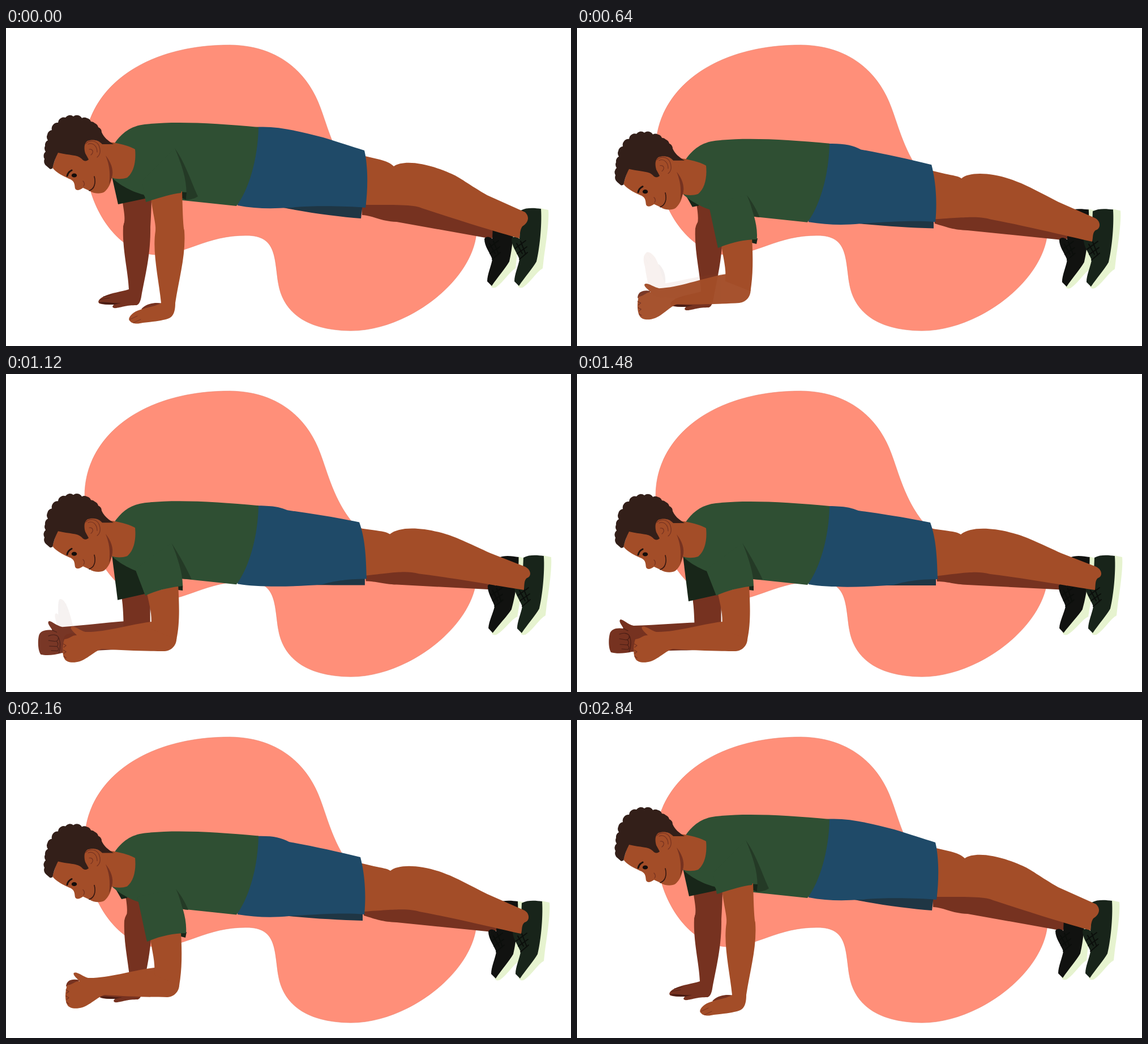
Write an HTML page that moves like this. It is 998 by 561 pixels and loops after 2.88 s.

```html
<!DOCTYPE html>
<html lang="en">
<head>
<meta charset="utf-8">
<title>Plank up-down</title>
<style>
  html, body { margin: 0; width: 100%; height: 100%; overflow: hidden; background: #fff; }
  svg { display: block; width: 100%; height: 100%; }
</style>
</head>
<body>
<svg id="stage" viewBox="0 0 998 561"></svg>
<script>
const LOOP = 2880;
const SKIN = '#a34d28', SHADE = '#763220', DEEP = '#4a1d14', HAIR = '#331f19';
const SHIRT = '#2f4f33', FOLD = '#243a26', SHIRT_DARK = '#182619';
const SHORTS = '#1f4a68', SHORTS_DARK = '#1f3644', SOLE = '#e6f3cf';

const stage = document.getElementById('stage');
const morphs = [];

function add(parent, tag, attrs) {
  const el = document.createElementNS('http://www.w3.org/2000/svg', tag);
  for (const key in attrs) el.setAttribute(key, attrs[key]);
  parent.appendChild(el);
  return el;
}
const group = (parent = stage) => add(parent, 'g', {});
const fill = (parent, color, d) => add(parent, 'path', { d, fill: color });
const line = (parent, color, width, d) => add(parent, 'path', {
  d, fill: 'none', stroke: color, 'stroke-width': width,
  'stroke-linecap': 'round', 'stroke-linejoin': 'round'
});

// A path with three poses: high plank, one forearm down, low plank.
function morph(color, high, half, low, nearArm = false) {
  const nums = s => s.match(/[\d.]+/g).map(Number);
  const el = fill(stage, color, high);
  morphs.push({ el, nearArm, form: high, poses: [high, half, low].map(nums) });
  return el;
}

const blend = (a, b, c, u, v) => a + (b - a) * u + (c - b) * v;
const blendAll = (poses, u, v) => poses[0].map((a, i) => blend(a, poses[1][i], poses[2][i], u, v));

const blob = fill(stage, '#ff8f79', 'M139,215 C139,110 240,30 395,30 C483,31 533,80 555,140 ' +
  'C568,174 579,222 612,262 C670,310 832,300 831,362 C822,450 705,535 608,534 C535,533 490,505 481,450 ' +
  'C474,405 478,366 425,366 C355,365 318,400 265,400 C200,398 139,320 139,215Z');
blob.setAttribute('stroke', '#e8806c');
blob.setAttribute('stroke-width', .6);

// Far arm
const farPlank = group();
fill(farPlank, SHADE, 'M232,438 C190,438 140,443 100,444 C90,442 82,433 77,433 C72,436 80,444 82,449 ' +
  'C70,447 60,450 58,458 C55,470 56,485 60,491 C70,494 85,493 97,490 C130,488 200,488 232,486 ' +
  'C262,484 262,440 232,438Z');
line(farPlank, DEEP, 1.2, 'M75,459 C82,456 89,457 92,461 C93,466 91,469 86,469 L75,467 M76,477 L89,478 ' +
  'C92,476 92,472 89,469 M79,485 L90,486 C93,484 92,480 89,478 M92,461 C96,468 96,480 92,490 M82,449 L90,453');
const farFlat = group();
fill(farFlat, SHADE, 'M207,350 C205,390 216,430 217,461 C205,465 186,467 172,474 C164,478 161,483 165,486 ' +
  'C176,489 186,487 191,488 C186,491 188,495 195,494 C207,492 212,489 231,489 C236,487 238,480 239,474 ' +
  'C245,440 256,400 255,350 C250,320 212,320 207,350Z');
fill(farFlat, DEEP, 'M164,484 C174,482 188,486 203,485 L191,488 C180,488 170,488 164,484Z');
line(farFlat, DEEP, .8, 'M167,479 L183,476 M172,474 L186,471');

morph(SHADE,
  'M205,300 C208,325 212,335 207,352 L255,352 C256,335 257,315 257,295Z',
  'M211,308 C214,330 216,340 210,356 L257,356 C258,340 258,320 258,300Z',
  'M204,395 C207,415 207,430 208,455 L255,455 C254,425 255,405 256,385Z');
morph(SHIRT_DARK,
  'M187,262 L198,311 L255,299 L230,278Z',
  'M190,292 L204,316 L214,314 L215,298Z',
  'M187,320 L197,401 L246,390 L230,340Z');

// Legs and shoes
const farLeg = morph(SHADE,
  'M628,308 L629,330 C650,331 660,341 690,342 L858,372 L866,355 L735,310 L700,300Z',
  'M630,334 L632,345 C655,352 665,356 690,357 L860,374 L890,362 L735,330 L700,322Z',
  'M634,354 L636,366 C655,366 665,371 690,372 L866,381 L900,372 L735,345 L700,338Z');

function shoe(color) {
  const g = group();
  fill(g, SOLE, 'M944,318 L958,321 C960,340 953,385 950,406 L948,424 C937,430 928,447 914,457 ' +
    'C909,460 904,458 904,453 L934,412Z');
  fill(g, color, 'M909,322 C920,316 935,318 945,319 C947,350 942,392 937,412 C930,424 916,440 906,455 ' +
    'L898,447 C898,435 905,420 907,408 C902,395 893,385 893,372 C896,367 902,368 907,372Z');
  line(g, '#0b0e0b', 2, 'M899,389 L918,375 M903,398 L920,386 M907,408 L921,396 M902,380 L912,398 M909,376 L918,399');
  return g;
}
const farShoe = shoe('#111210');
const nearShoe = shoe('#18241a');

morph(SKIN,
  'M630,225 L660,232 C672,235 680,239 685,244 C700,234 735,235 784,256 C800,262 820,278 850,295 L917,325 ' +
  'C926,334 922,344 912,350 C908,356 908,362 907,371 C880,364 820,346 735,318 C722,312 700,312 636,312Z',
  'M625,252 L650,258 C664,261 674,262 679,266 C692,254 735,254 778,272 C795,278 820,292 850,307 L916,336 ' +
  'C926,342 925,355 916,357 C910,362 912,370 910,377 C880,371 810,353 730,338 C710,332 690,334 630,338Z',
  'M620,272 L650,276 C664,278 672,279 678,283 C695,269 735,270 778,283 C795,288 825,302 855,316 L917,340 ' +
  'C929,346 928,358 920,360 C915,364 916,372 915,381 C880,376 790,360 730,353 C705,347 690,350 630,357Z');

morph(SHORTS_DARK,
  'M480,312 L490,317 C540,327 590,333 627,336 L630,310Z',
  'M485,342 L500,346 C540,350 590,353 630,354 L630,335Z',
  'M500,368 L520,373 C560,373 600,373 634,373 L634,355Z');
morph(SHORTS,
  'M440,175 C480,172 520,183 560,193 C590,202 610,209 633,216 C639,240 640,280 635,317 ' +
  'C600,314 540,313 500,317 C470,319 440,319 409,313 C410,285 425,235 440,175Z',
  'M440,205 C470,204 485,207 500,215 C540,222 585,232 626,242 C632,265 637,300 633,343 ' +
  'C600,340 560,342 500,346 C470,349 440,348 409,343 C410,315 425,265 440,205Z',
  'M440,233 C470,233 482,235 497,241 C540,247 585,254 624,262 C634,290 636,320 637,362 ' +
  'C600,362 575,367 560,372 C510,376 450,378 409,371 C410,343 425,293 440,233Z');

// Torso and head move as one piece
const body = group();
fill(body, SHIRT, 'M192,203 C205,185 220,173 245,170 C300,164 370,168 446,175 C445,232 428,287 407,314 ' +
  'L312,304 L247,300 L243,294 C225,290 200,277 187,264Z');
fill(body, SKIN, 'M165,200 L190,202 C205,205 220,209 228,214 C230,235 226,254 214,264 C205,267 195,267 187,264 L165,250Z');
fill(body, SKIN, 'M82,246 C86,254 104,263 114,267 C122,271 121,278 122,283 C124,288 131,286 136,282 L147,287 ' +
  'C156,293 168,293 174,289 C182,282 186,272 187,262 L178,205 L150,195 L92,215Z');
fill(body, SHADE, 'M176,225 C182,240 185,254 182,276 L187,264 C191,250 185,236 176,225Z');

const curls = [68, 231, 70, 218, 69, 208, 74, 198, 73, 188, 81, 180, 83, 171, 92, 167, 97, 159, 105, 158,
  111, 154, 119, 156, 127, 154, 134, 159, 143, 159, 150, 165, 157, 168, 163, 175, 169, 184];
let outline = 'M78,249 L71,243';
for (let i = 0; i < curls.length; i += 2) outline += ` A10,10 0 0 1 ${curls[i]},${curls[i + 1]}`;
fill(body, HAIR, outline + ' C173,193 180,199 190,205 L170,205 C163,197 152,196 144,199 C137,204 138,214 140,221 ' +
  'L146,232 C141,236 137,235 134,231 C126,223 112,225 92,220 C87,229 84,239 82,248Z');
fill(body, SKIN, 'M140,206 C145,196 160,197 165,207 C169,218 166,228 155,230 C147,230 140,222 140,206Z');
line(body, SHADE, 1.2, 'M141,204 C147,197 159,198 164,207 C168,217 166,224 161,228 ' +
  'M145,205 C153,201 161,208 161,219 M147,214 C153,213 156,219 150,224 M136,270 C139,273 139,276 137,279');
line(body, '#1f120e', 3, 'M108,261 C109,256 112,253 116,251');
add(body, 'ellipse', { cx: 120.5, cy: 260, rx: 4.7, ry: 3.6, fill: '#150d0b' });
line(body, '#351711', 1.6, 'M156,262 C159,274 156,284 147,287');

morph(FOLD,
  'M298,212 C318,240 328,275 339,297 C333,301 325,303 318,303 C322,270 308,235 298,212Z',
  'M300,298 C310,310 318,325 322,335 C318,335 314,334 311,333 C309,320 305,308 300,298Z',
  'M292,298 C305,318 320,345 328,363 C322,363 316,362 311,362 C306,335 300,315 292,298Z', true);
morph(SHIRT_DARK,
  'M307,289 L319,290 L318,303 L310,300Z',
  'M306,375 L319,374 L317,384 L309,382Z',
  'M300,374 L312,373 L312,382 L304,381Z', true);

// Near arm
const nearPlank = group();
fill(nearPlank, SHADE, 'M106,470 C107,458 118,456 130,459 L120,470Z');
fill(nearPlank, SKIN, 'M262,437 C225,441 180,456 145,455 C135,452 125,443 120,446 C117,450 126,456 130,461 ' +
  'C122,460 120,466 108,468 C104,480 104,495 108,502 C112,510 125,510 135,507 C150,502 165,486 175,485 ' +
  'C215,488 260,489 285,489 C300,488 307,475 306,465 C300,440 280,435 262,437Z');
line(nearPlank, SHADE, 1.3, 'M106,476 L111,479 L107,482 M106,487 L111,490 L107,493 M107,498 L111,501');
const nearFlat = group();
fill(nearFlat, SHADE, 'M239,496 C246,487 262,483 276,486 L268,496Z');
fill(nearFlat, SKIN, 'M264,358 C258,395 270,445 274,485 C264,492 238,494 226,502 C218,508 215,514 219,517 ' +
  'C224,523 234,522 242,520 C262,518 278,516 288,512 C297,508 299,497 299,485 ' +
  'C306,440 318,400 315,358 C310,326 268,326 264,358Z');
line(nearFlat, SHADE, .9, 'M219,514 L232,508 M225,520 L238,514');
morph(SKIN,
  'M256,296 C258,325 266,345 264,362 L315,362 C312,340 312,315 311,288Z',
  'M255,385 C258,410 264,425 262,450 L306,468 C311,440 311,410 309,374Z',
  'M249,388 C255,415 258,425 256,450 L301,468 C307,440 306,410 304,372Z', true);
morph(SHIRT,
  'M240,270 L247,307 C270,300 290,293 309,291 C318,265 308,235 298,212Z',
  'M232,312 L249,391 C270,382 295,376 318,376 C320,350 310,325 300,298Z',
  'M228,345 L246,391 C265,382 290,376 312,374 C312,350 303,325 292,298Z', true);

const ramp = (t, start) => {
  const x = Math.min(1, Math.max(0, (t - start) / 480));
  return x * x * (3 - 2 * x);
};

// Swings both forearm drawings about the elbow and fades between them.
function bend(flat, plank, from, to, elbow, sweep, k) {
  const place = (el, rest, angle, alpha) => {
    el.setAttribute('transform', `translate(${elbow[0] - rest[0]} ${elbow[1] - rest[1]}) rotate(${angle} ${rest})`);
    el.setAttribute('opacity', alpha);
  };
  place(flat, from, 90 * k, Math.min(1, 2 - 2 * k));
  place(plank, to, sweep * (k - 1), k);
}

function draw(t) {
  const u = ramp(t, 208) - ramp(t, 2222);
  const v = ramp(t, 688) - ramp(t, 1640);
  const k = Math.pow(Math.max(0, u), 1.35);

  for (const m of morphs) {
    const values = blendAll(m.poses, m.nearArm ? k : u, v);
    let n = 0;
    m.el.setAttribute('d', m.form.replace(/[\d.]+/g, () => values[n++].toFixed(2)));
  }

  body.setAttribute('transform', `translate(0 ${blend(0, 29.5, 58, u, v)})`);

  const hop = 4.5 * Math.sin(Math.PI * u);
  farLeg.setAttribute('transform', `translate(0 ${hop * .8})`);
  nearShoe.setAttribute('transform', `translate(${blend(0, 2, 5, u, v)} ${blend(0, 1, 2, u, v) + hop})`);
  farShoe.setAttribute('transform', `translate(${blend(-48, -41, -41, u, v)} ${blend(0, 1, 3, u, v) + hop}) ` +
    `rotate(${3 * v} 925 350)`);

  bend(farFlat, farPlank, [231, 350], [232, 462], blendAll([[231, 350], [233, 354], [232, 462]], u, v), 82, v);
  bend(nearFlat, nearPlank, [290, 360], [282, 463], blendAll([[290, 360], [282, 463], [277, 463]], k, v), 92, k);
}

function tick(now) {
  draw(now % LOOP);
  requestAnimationFrame(tick);
}
draw(0);
requestAnimationFrame(tick);
</script>
</body>
</html>
```
